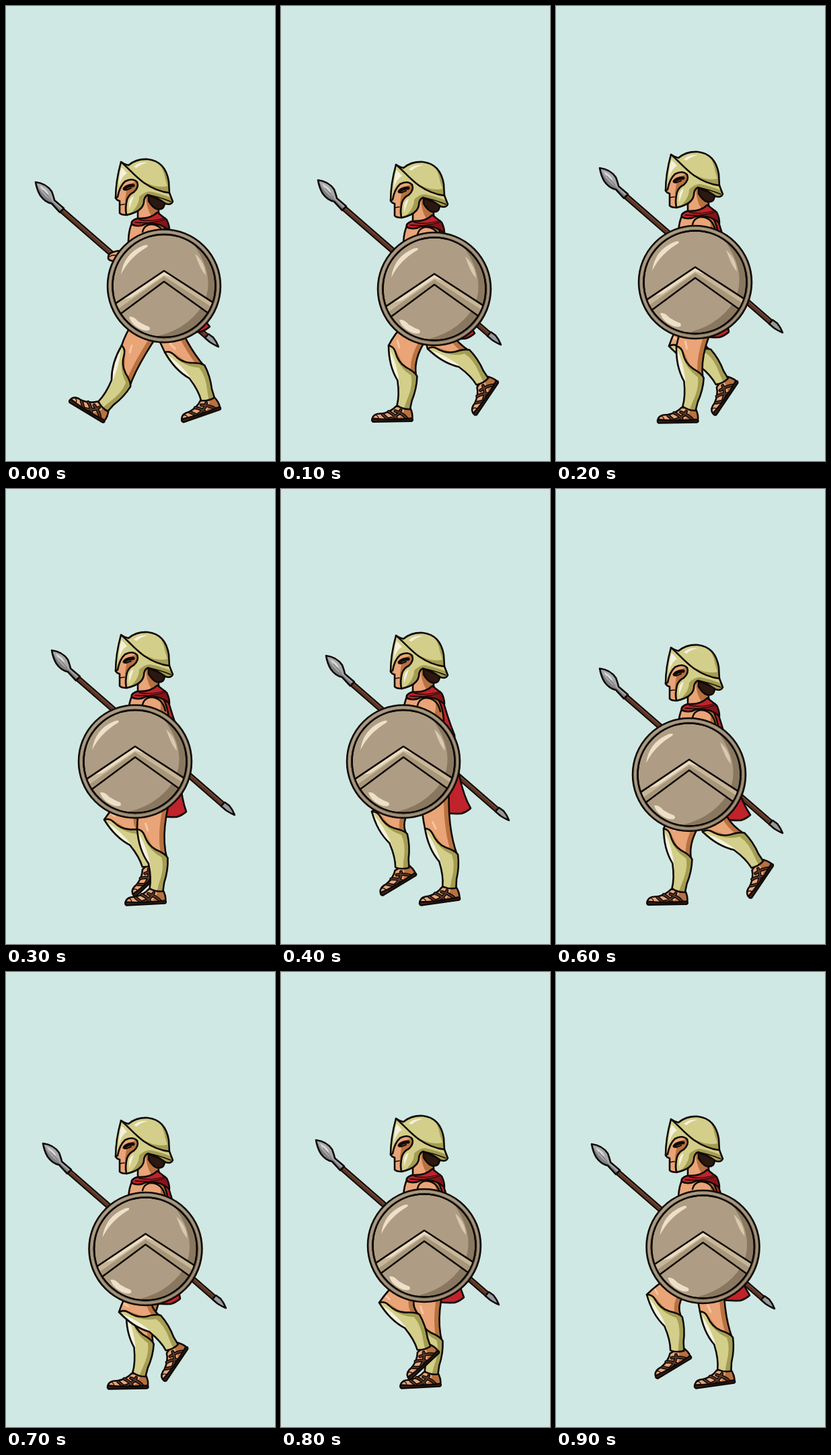
Animation, 400 px wide and 677 px high, one loop 1000 ms. Source, as an HTML page with a canvas:

```html
<!DOCTYPE html>
<html lang="en">
<head>
<meta charset="utf-8">
<title>Marching hoplite</title>
<style>
html, body { margin: 0; height: 100%; overflow: hidden; background: #d0e8e4; }
canvas { display: block; }
</style>
</head>
<body>
<canvas id="stage" width="400" height="677"></canvas>
<script>
const ctx = document.getElementById('stage').getContext('2d');
const INK = '#100a06', SKIN = '#e9a477', TAN = '#b8713f';
const GOLD = '#d3ce89', OLIVE = '#a39c52', CREAM = '#f3f0de';
const RED = '#c0232b', WINE = '#861319', BROWN = '#5c3524';
const rad = deg => deg * Math.PI / 180;

// One entry per 100 ms step.
const bob = [0, 4, -11, -15, -14, 0, 4, -11, -14, -13];
const shield = [[235, 416.5], [228, 421], [207, 411], [192, 405.5], [182, 405.5],
  [189.5, 421.5], [198, 425], [207.5, 412], [213, 407], [218.5, 409]];
const spear = [[44, 262], [55, 259], [65, 241], [68, 240], [67, 248],
  [74, 268], [65, 267], [55, 255], [52, 250], [53, 256]];
const cape = [[303, 477], [288, 487], [257, 485], [268, 480], [282, 475],
  [305, 471], [289, 485], [259, 486], [272, 484], [288, 481]];
// Knee x, knee y, shin angle, foot angle: five steps planted, five swinging.
const gait = [[172, 505, -17.5, 32], [160, 505, 13, 0], [179, 506, 11, 0],
  [195, 506, 17, -2], [214, 505, 22, -7], [236, 515, 42, -18],
  [218, 510, 58.6, -55], [168, 506, 55.7, -55], [146, 492, 44, -42], [135, 480, 28, -30]];

const asPath = p => typeof p === 'string' ? new Path2D(p) : p;

function line(p, width = 2.6, color = INK) {
  ctx.lineWidth = width;
  ctx.strokeStyle = color;
  ctx.stroke(asPath(p));
}

// Filled and outlined shape; extra [path, colour] pairs are clipped inside it.
function part(p, fill, ...inner) {
  p = asPath(p);
  ctx.fillStyle = fill;
  ctx.fill(p);
  ctx.save();
  ctx.clip(p);
  for (const [q, color] of inner) {
    ctx.fillStyle = color;
    ctx.fill(asPath(q));
  }
  ctx.restore();
  line(p);
}

function at(x, y, deg, draw) {
  ctx.save();
  ctx.translate(x, y);
  ctx.rotate(rad(deg));
  draw();
  ctx.restore();
}

function drawSpear() {
  line('M40 43L255 230', 9);
  line('M40 43L255 230', 5, BROWN);
  line('M41 42L255 228', 1, '#8a5740');
  part('M0 0Q16 2 24 14Q27 22 28 27L42 39L36 45L24 32Q14 30 7 20Q2 12 0 0Z', '#a6a8a9',
    ['M0 0Q8 18 24 28L40 42L34 48L22 34Q0 28 0 0Z', '#7d7f81'],
    ['M6 5Q16 9 20 19Q10 14 6 5Z', '#d6d8d8']);
  line('M11 12L23 26', 1, '#606264');
  part('M257 226L264 231Q269 237 272 245Q263 241 259 238L252 232Z', '#96999b');
  part('M130 102Q120 102 116 104Q107 106 108 114Q111 118 116 117L122 124L142 120Z', SKIN);
  line('M110 111Q115 107 121 110', 1.5);
}

function drawCape([x, y], dy) {
  const top = 318 + dy;
  part(`M205 ${top - 4}L238 ${top}Q247 ${top + 35} 258 ${top + 62}` +
    `Q${x / 2 + 121} ${y - 35} ${x} ${y}Q${x - 5} ${y + 5} ${x - 14} ${y + 8}` +
    `Q${x - 38} ${y + 9} ${x - 65} ${y + 3}L190 430Z`, RED,
    [`M234 ${top + 8}Q240 ${top + 55} 252 ${top + 85}Q${x - 42} ${y - 30} ${x - 44} ${y + 12}L190 440Z`, WINE]);
}

function drawFoot() {
  part('M-11 -3Q-18 5 -32 8Q-43 7 -46 14L-46 17L13 17Q15 8 9 -3Z', SKIN,
    ['M2 -3L12 -3L16 20L-20 20Q2 14 2 -3Z', TAN]);
  const straps = 'M-31 9L-22 17M-22 5Q-13 9 -9 17M-22 16Q-9 13 -4 3M-12 4Q0 8 6 16';
  line(straps, 5);
  line(straps, 2, '#5b3a2b');
  line('M-42 10Q-38 10 -37 15', 1.3);
  part('M-46 15Q-20 18 13 15Q15 18 12 19L-45 20Q-48 18 -46 15Z', '#3d241b');
}

function drawShin() {
  part('M0 0Q8 1 11 8Q17 23 30 29Q44 34 48 40Q50 58 45 77L44 90Q34 92 24 87Q26 72 20 50Q4 30 0 0Z', GOLD,
    ['M11 8Q20 40 36 48Q40 70 34 95L60 95L55 30L20 10Z', OLIVE],
    ['M9 8Q18 30 39 40Q44 55 38 76L34 92L20 92L16 50Z', GOLD],
    ['M3 6Q12 20 17 34Q22 46 24 60Q7 35 3 6Z', CREAM]);
}

function drawLeg([x, y, shin, foot], dy) {
  const turn = 20.5 - shin, c = Math.cos(rad(turn)), s = Math.sin(rad(turn));
  const local = (u, v) => [x + u * c - v * s, y + u * s + v * c];
  const ankle = local(34, 90), calf = local(47, 41), bend = local(33, 0);
  const hip = [212, 448 + dy], seat = [250, 455 + dy];
  const mid = [(x + hip[0]) / 2 - 8, (y + hip[1]) / 2 - 8];
  const back = `L${calf}Q${bend} ${seat}`;
  const thigh = new Path2D(`M${hip}Q${mid} ${x} ${y}L${local(20, 40)}${back}Z`);

  at(...ankle, foot, drawFoot);
  ctx.fillStyle = SKIN;
  ctx.fill(thigh);
  ctx.save();
  ctx.clip(thigh);
  line(`M${calf}Q${bend} ${seat}`, 15, TAN);
  line(`M${local(6, 3)}Q${local(14, 12)} ${local(22, 26)}`, 5, '#c98452');
  line(`M${local(12, -9)}L${local(16, 1)}`, 3, '#f6c6a1');
  ctx.restore();
  line(thigh);
  at(x, y, turn, drawShin);
}

function drawBody() {
  part('M188 322Q181 334 182 362L242 362Q242 336 228 318Z', SKIN,
    ['M226 322Q240 330 242 362L222 362Q236 340 226 322Z', TAN]);
  line('M203 336Q205 327 214 325Q232 324 237 345');
  part('M210 276L196 306L196 318L228 316L225 286Z', SKIN,
    ['M208 280L230 284L228 318L216 312Q208 300 208 280Z', TAN]);
  part('M212 282L236 291Q236 305 224 302Q218 300 212 290Z', '#2c1810');
  part('M187 325Q185 319 196 316Q215 317 225 307L239 318Q243 326 243 334Q228 321 208 324Q197 330 187 325Z', RED,
    ['M190 328Q214 324 238 316L246 338Q225 320 205 326Z', WINE]);
  line('M198 318Q215 322 237 315M192 322Q215 324 235 318', 1.3);
}

function drawHead() {
  part('M169 255L163 285Q164 289 169 290L169 308Q171 311 180 311L200 296L198 255Z', SKIN,
    ['M180 270Q186 262 194 262L194 280L180 290L180 314L176 304L177 288Z', TAN]);
  line('M169 296L176 295', 1.6);
  line('M176 272Q180 267 189 267', 5);
  line('M178 274L186 271', 2);
  part('M171 232Q177 236 182 237Q194 227 211 228Q237 231 242 261L243 279Q220 282 200 268Z', GOLD,
    ['M182 244Q214 274 240 268Q232 240 224 231L250 230L250 284L205 272Z', OLIVE],
    ['M190 238Q214 258 237 264Q236 240 222 229L185 229Z', GOLD],
    ['M190 239Q199 231 211 233Q202 234 194 241Z', CREAM]);
  part('M171 232C181 240 190 252 205 263Q224 276 243 278L248 291Q245 297 237 294Q224 284 211 281' +
    'Q205 284 205 292Q203 306 179 311Q177 300 180 288Q183 280 190 277Q198 270 195 262' +
    'Q188 255 177 261Q169 268 166 284L163 286Q163 261 171 232Z', GOLD,
    ['M198 284Q206 276 214 276Q230 279 247 286L250 300L208 282L206 300L178 314Q198 300 198 284Z', OLIVE],
    ['M172 240Q176 244 180 249Q172 252 168 268Q168 252 172 240Z', CREAM],
    ['M183 292Q185 285 190 283Q187 292 183 303Z', CREAM]);
  line('M211 281Q228 284 245 291', 1.5);
}

function drawShield() {
  const disc = r => { const p = new Path2D(); p.arc(0, 0, r, 0, 7); return p; };
  const rim = ctx.createLinearGradient(-60, -60, 60, 60);
  rim.addColorStop(0, '#a3947c');
  rim.addColorStop(1, '#85765f');
  part(disc(84), rim);
  line(disc(80.5), 1.2, '#b3a38a');
  const face = disc(76.5);
  part(face, '#ae9d84',
    ['M30 -80Q82 -20 58 28Q30 72 -30 78L80 80L90 -80Z', '#89785f'],
    ['M26 -80Q78 -20 52 30Q20 70 -40 72L-80 0L-30 -80Z', '#ae9d84'],
    ['M-64 -17Q-60 -48 -31 -60Q-22 -63 -25 -58Q-52 -42 -64 -17Z', '#eee0c8'],
    ['M46 -48Q61 -35 62 -16Q54 -24 46 -48Z', '#d9c9ae'],
    ['M-52 46Q-46 44 -38 53Q-30 58 -22 61Q-18 68 -30 66Q-48 60 -52 46Z', '#eee0c8']);
  ctx.save();
  ctx.clip(face);
  part('M-78 30L0 -22.5L78 28L72 45L0 -6.5L-72 47Z', '#c7b697',
    ['M0 -14L78 36L72 48L0 -2L-72 50L-78 41Z', '#a79679'],
    ['M-60 20L0 -21L14 -12L0 -16L-48 17Z', '#eadcc2']);
  ctx.restore();
  line(face);
}

function draw() {
  const i = Math.floor(performance.now() / 100) % 10, dy = bob[i];
  ctx.fillStyle = '#d0e8e4';
  ctx.fillRect(0, 0, 400, 677);
  ctx.lineJoin = ctx.lineCap = 'round';
  at(...spear[i], 0, drawSpear);
  drawCape(cape[i], dy);
  drawLeg(gait[(i + 5) % 10], dy);
  drawLeg(gait[i], dy);
  at(0, dy, 0, () => { drawBody(); drawHead(); });
  at(...shield[i], 0, drawShield);
  requestAnimationFrame(draw);
}
draw();
</script>
</body>
</html>
```
